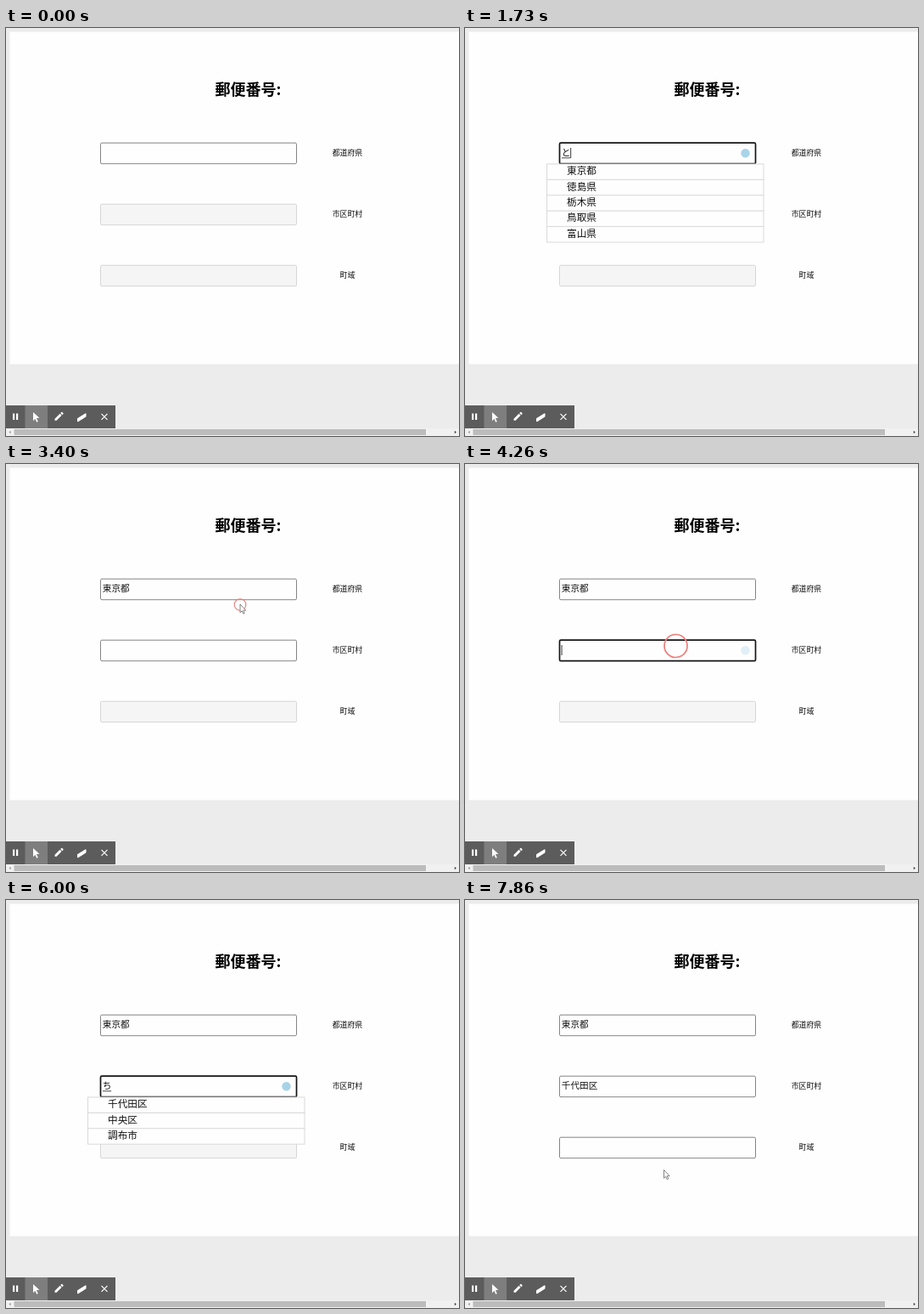
Animation, 534 px wide and 480 px high, one loop 8000 ms. Source, as an HTML page:

```html
<!DOCTYPE html>
<html lang="ja">
<head>
<meta charset="utf-8">
<title>郵便番号</title>
<style>
  html, body { margin: 0; width: 100%; height: 100%; overflow: hidden; background: #ececec; }
  svg { display: block; width: 534px; height: 480px; }
  text { font-family: "Noto Sans CJK JP", "Noto Sans CJK", sans-serif; fill: #111; white-space: pre; }
  .title { font-size: 18px; font-weight: 700; fill: #000; }
  .label { font-size: 8.9px; text-anchor: middle; }
  .value { font-size: 10.65px; }
  .item { font-size: 11.65px; }
</style>
</head>
<body>
<svg viewBox="0 0 534 480">
  <rect x="4.5" y="4.5" width="530" height="391" fill="#fefefe"/>
  <text class="title" x="246.5" y="79.3">郵便番号:</text>
  <g id="form"></g>

  <g id="toolbar">
    <rect y="444" width="129" height="27" fill="#5c5c5c"/>
    <rect x="22.5" y="444" width="26.5" height="27" fill="#7e7e7e"/>
    <g fill="#fff">
      <path d="M8 453.5h2.2v7.5H8zM12 453.5h2.2v7.5H12z"/>
      <path d="M32 452l7.4 6.8-3.5.3 1.9 3.9-1.6.8-1.8-4-2.4 2.4z"/>
      <path d="M57.5 461.8v-2.1l6-6 2.1 2.1-6 6zM64.200 453l1-1q.6-.5 1.200 0l1 1q.5.6 0 1.200l-1 1z"/>
      <path d="M84 459.300l9.300-5.800q1.200-.5 1.200.7v2.300q0 .8-.7 1.300l-8.300 5.200q-1.500.6-1.500-.7z"/>
    </g>
    <path d="M112.500 453.800l7 7m0-7l-7 7" stroke="#fff" stroke-width="1.200"/>
  </g>

  <rect y="471" width="534" height="9" fill="#f1f1f1"/>
  <rect x="9.500" y="472" width="485.500" height="7" fill="#bcbcbc"/>
  <path d="M3.500 475.500l2.200-1.800v3.600z" fill="#999"/>
  <path d="M531 475.500l-2.200-1.800v3.600z" fill="#444"/>

  <circle id="ring" fill="none" stroke="#ec7f7c"/>
  <path id="pointer" d="M0 0v9.800l2.200-2 1.500 3.400 1.500-.7-1.500-3.300h3z"
        fill="#fff" stroke="#666" stroke-width=".8"/>
</svg>
<script>
const LOOP = 8000;
const TICK = 200 / 3;
const BLINK = 1600 / 3;
const FIELD = { x: 111.5, w: 231, h: 24.5, tops: [135, 207, 279] };
const ROW_H = 18.4;
const EM = 10.65;

const prefectures = ['東京都', '徳島県', '栃木県', '鳥取県', '富山県'];
const cities = ['千代田区', '中央区', '調布市'];

// open: number of enabled fields
const scenes = [
  { at: 0, open: 1, values: [] },
  { at: 330, open: 1, values: [], focus: 0 },
  { at: 1600, open: 1, values: ['ｔ'], focus: 0 },
  { at: 1660, open: 1, values: ['と'], focus: 0, list: prefectures, under: 0 },
  { at: 3260, open: 1, values: ['と'], list: prefectures, under: 0 },
  { at: 3330, open: 2, values: ['東京都'] },
  { at: 4200, open: 2, values: ['東京都'], focus: 1 },
  { at: 5200, open: 2, values: ['東京都', 'ｔ'], focus: 1 },
  { at: 5460, open: 2, values: ['東京都', 'ち'], focus: 1, list: cities, under: 1 },
  { at: 7400, open: 2, values: ['東京都', 'ち'], list: cities, under: 1 },
  { at: 7530, open: 3, values: ['東京都', '千代田区'] }
];

// time, x, y
const path = [
  [60, 20, 440], [260, 250, 147], [2930, 250, 152], [3130, 276, 165],
  [3460, 276, 165], [3530, 275, 176], [3660, 275, 176], [3930, 248.5, 213.500],
  [6730, 248.5, 213.500], [7060, 252.5, 243], [7660, 252.5, 243], [7860, 234.5, 317.5]
];

// press, release
const clicks = [[330, 400], [3260, 3330], [4200, 4260], [7400, 7530]];

const $ = id => document.getElementById(id);

function add(parent, tag, attrs, text) {
  const el = document.createElementNS('http://www.w3.org/2000/svg', tag);
  set(el, attrs);
  if (text) el.textContent = text;
  return parent.appendChild(el);
}

function set(el, attrs) {
  for (const key in attrs) el.setAttribute(key, attrs[key]);
}

const show = (el, on) => el.setAttribute('visibility', on ? 'visible' : 'hidden');

const form = $('form');
const fields = FIELD.tops.map((y, i) => {
  const box = add(form, 'rect', { x: FIELD.x, y: y + .2, width: FIELD.w, height: FIELD.h, rx: 1.5 });
  add(form, 'text', { class: 'label', x: 402.4, y: y + 15.4 }, ['都道府県', '市区町村', '町域'][i]);
  const value = add(form, 'text', { class: 'value', x: 113.8, y: y + 15.4 });
  return { box, value };
});
const underline = add(form, 'rect', { x: 114, height: .9, fill: '#333' });
const caret = add(form, 'rect', { width: .9, height: 12, fill: '#222' });
const icon = add(form, 'circle', { cx: 330.5, r: 5.2, fill: '#a9d3e8' });

function makeList(items, top) {
  const group = add(form, 'g', {});
  items.forEach((name, i) => {
    const y = top + i * ROW_H;
    add(group, 'rect', { x: 96.5, y, width: 255.5, height: ROW_H, fill: '#fefefe', stroke: '#dadada' });
    add(group, 'text', { class: 'item', x: 120, y: y + 12.2 }, name);
  });
  return group;
}
const lists = [makeList(prefectures, 160), makeList(cities, 232)];

function pointerAt(t) {
  const next = path.findIndex(p => p[0] > t);
  if (next < 0) return path[path.length - 1].slice(1);
  if (next === 0) return null;
  const [t0, x0, y0] = path[next - 1], [t1, x1, y1] = path[next];
  const k = (t - t0) / (t1 - t0);
  return [x0 + (x1 - x0) * k, y0 + (y1 - y0) * k];
}

function radiusAt(t) {
  const click = clicks.find(([down, up]) => t >= down && t < up + 2 * TICK - 8);
  if (!click) return 0;
  return t < click[1] ? 17.8 : t < click[1] + TICK - 8 ? 13.5 : 6.8;
}

const overField = (x, y, open) => FIELD.tops.some((top, i) =>
  i < open && x > FIELD.x && x < FIELD.x + FIELD.w && y > top && y < top + FIELD.h);

function drawForm(t, scene) {
  const { open, values, focus, under, at } = scene;
  const focused = focus !== undefined;
  fields.forEach(({ box, value }, i) => {
    set(box, {
      fill: i < open ? '#fefefe' : '#f5f5f5',
      stroke: i === focus ? '#151515' : i < open ? '#858585' : '#d6d6d6',
      'stroke-width': i === focus ? 1.7 : 1
    });
    value.textContent = values[i] || '';
  });
  lists.forEach((list, i) => show(list, i === under));

  const length = focused ? (values[focus] || '').length : 0;
  const start = Math.round(at / TICK) * TICK;
  show(caret, focused && Math.floor((t - start + 1) / BLINK) % 2 === 0);
  show(underline, length > 0);
  show(icon, focused);
  if (!focused) return;

  const top = FIELD.tops[focus];
  const focusAt = scenes.find(s => s.focus === focus).at;
  set(caret, { x: 113.6 + EM * length, y: top + 6 });
  set(underline, { y: top + 17.4, width: EM * length - .5 });
  set(icon, { cy: top + 12.2, opacity: Math.min(1, (t - focusAt) / 200) });
}

function draw(now) {
  const t = Math.floor((now % LOOP + 7) / TICK) * TICK;
  const scene = scenes.filter(s => s.at <= t + 1).pop();
  drawForm(t, scene);

  const pos = pointerAt(t);
  const r = radiusAt(t);
  show($('pointer'), pos && !overField(...pos, scene.open));
  show($('ring'), r > 0);
  if (!pos) return;
  const [x, y] = pos;
  set($('pointer'), { transform: `translate(${x} ${y})` });
  set($('ring'), { cx: x, cy: y + .5, r, 'stroke-width': .5 + r / 11 });
}

const began = performance.now();
function loop() {
  draw(performance.now() - began);
  requestAnimationFrame(loop);
}
loop();
</script>
</body>
</html>
```
